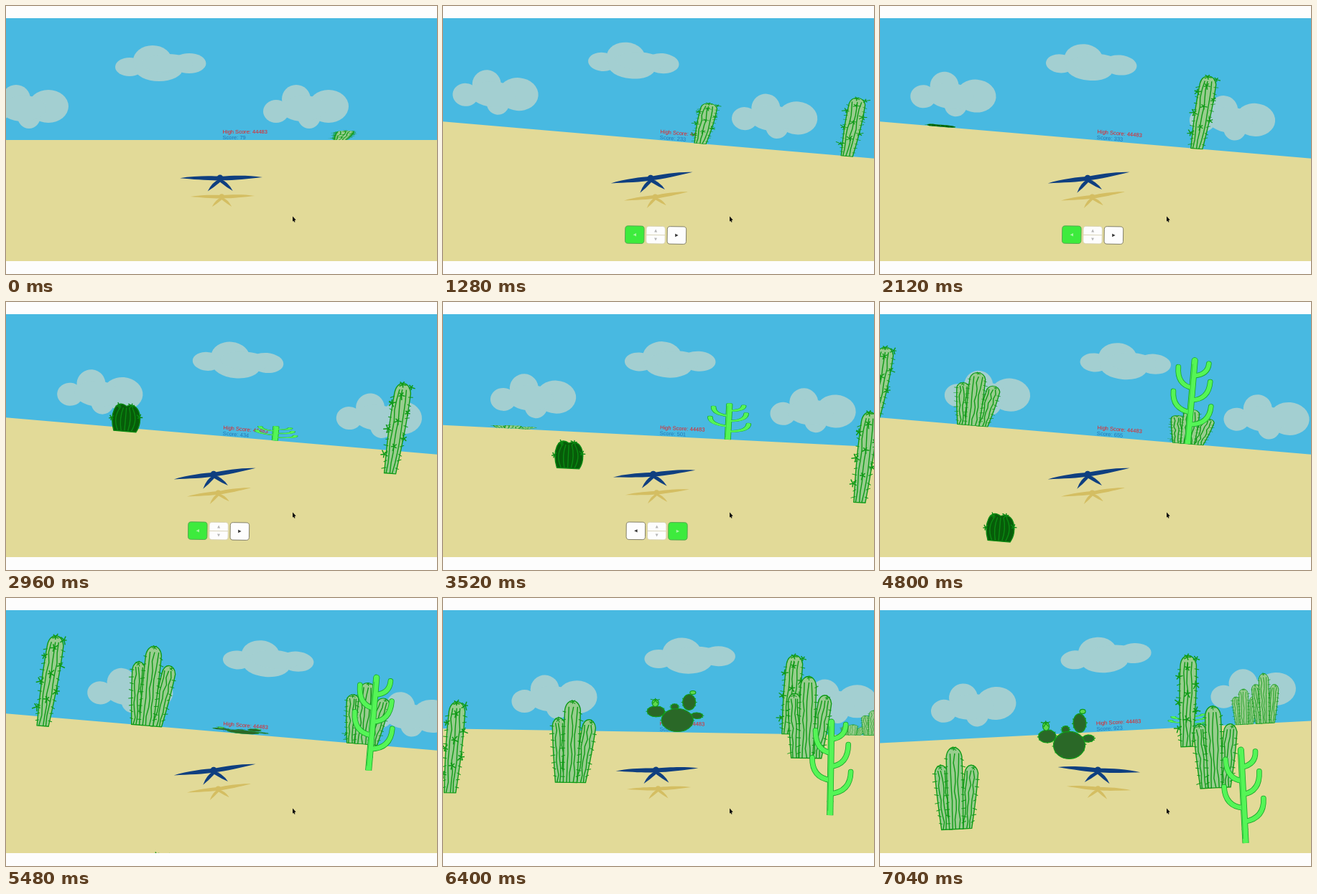
These frames come from a looping animation (600 by 374 pixels, 7.08 s). An HTML page with a canvas:

```html
<!DOCTYPE html>
<html lang="en">
<head>
<meta charset="utf-8">
<title>Desert flight</title>
<style>
html, body { margin: 0; width: 100%; height: 100%; overflow: hidden; background: #fdfdfd; }
canvas { display: block; }
</style>
</head>
<body>
<canvas id="stage" width="600" height="374"></canvas>
<script>
const ctx = document.getElementById('stage').getContext('2d');
const LOOP = 7080, STEP = 40, FRAMES = LOOP / STEP;
const CX = 300, HORIZON = 187, TOP = 17, BOTTOM = 356;

// Speeds per millisecond
const RISE = 0.0545, FALL = 0.083, SPREAD = 0.00016;
const CLOUD_TURN = 0.0345, GROUND_TURN = 0.099, ROLL = 0.006;
const MAX_TILT = 4.9, LAG = 200;

// The pilot steers left first and swaps direction at each later time
const switches = [92, 3190, 3840, 5730];

function steering(t) {
  const n = switches.filter(s => t >= s).length;
  return n && (n % 2 ? 1 : -1);
}

// Flight simulation in small steps, sampled once per frame
const DT = 4;
const flight = [];
for (let t = 0, tilt = 0, sky = 0, yaw = 0, swing = 0; t < LOOP; t += DT) {
  const dir = steering(t);
  if (t % STEP === 0) flight.push({ dir, tilt, sky, yaw });
  tilt = Math.max(-MAX_TILT, Math.min(MAX_TILT, tilt + dir * ROLL * DT));
  sky += dir * CLOUD_TURN * DT;
  swing += (dir - swing) * DT / LAG;
  yaw += swing * GROUND_TURN * DT;
}

function rng(seed) {
  return () => (seed = (seed * 16807) % 2147483647) / 2147483647;
}

function oval(x, y, rx, ry) {
  ctx.beginPath();
  ctx.ellipse(x, y, rx, ry, 0, 0, 7);
  ctx.fill();
}

function line(x1, y1, x2, y2) {
  ctx.beginPath();
  ctx.moveTo(x1, y1);
  ctx.lineTo(x2, y2);
  ctx.stroke();
}

function tuft(x, y, size, rand) {
  const start = rand() * 3;
  for (let i = 0; i < 5; i++) {
    const a = start + i * 1.26, r = size * (0.6 + rand() * 0.6);
    line(x, y, x + Math.cos(a) * r, y + Math.sin(a) * r);
  }
}

// Round-topped column leaning from (base, 0) to (tip, -h), with ribs and thorns
function stem(base, tip, h, w0, w1, rand) {
  const edge = (side, k) =>
    base + (tip - base) * k + side * (w0 + (w1 - w0) * Math.sin(k * 2)) / 2;
  const cap = w1 * 0.6, body = h - cap;
  ctx.beginPath();
  for (let k = 0; k < 1.01; k += 0.1) ctx.lineTo(edge(-1, k), -k * body);
  ctx.bezierCurveTo(edge(-0.8, 1), -h - cap / 3, edge(0.8, 1), -h - cap / 3, edge(1, 1), -body);
  for (let k = 1; k > -0.01; k -= 0.1) ctx.lineTo(edge(1, k), -k * body);
  ctx.closePath();
  ctx.fillStyle = '#98cd8e';
  ctx.strokeStyle = '#0f9a16';
  ctx.lineWidth = 1.4;
  ctx.fill();
  ctx.stroke();
  for (const s of [-0.5, 0, 0.5]) {
    ctx.beginPath();
    for (let k = 0; k <= 0.96; k += 0.12) ctx.lineTo(edge(s, k) + rand() * 3 - 1.5, -k * (h - 4));
    ctx.stroke();
  }
  ctx.lineWidth = 1;
  for (let y = 8; y < body; y += 10) {
    for (const s of [-1, 1]) {
      const x = edge(s, y / h);
      line(x - s * 2, -y, x + s * (2 + rand() * 3), -y + rand() * 6 - 3);
    }
  }
}

const kinds = {
  tall: {
    h: 128,
    draw(rand) {
      stem(0, 8, 127, 16, 23, rand);
      ctx.lineWidth = 1.5;
      for (let i = 0; i < 9; i++) {
        const y = 26 + i * 12;
        tuft(y * 0.06 + (i % 3 - 1) * 12, -y, 6, rand);
      }
      tuft(7, -125, 5, rand);
    }
  },
  cluster: {
    h: 114,
    draw(rand) {
      stem(-14, -18, 90, 15, 18, rand);
      stem(13, 24, 88, 15, 19, rand);
      stem(-1, 1, 114, 19, 22, rand);
      for (const [x, y] of [[1, -112], [27, -84], [-19, -87]]) tuft(x, y, 4, rand);
    }
  },
  saguaro: {
    h: 134,
    draw() {
      for (const [color, grow] of [['#17a528', 1.6], ['#55f556', 0]]) {
        ctx.strokeStyle = color;
        ctx.lineCap = 'round';
        ctx.lineWidth = 6 + grow;
        for (let i = 0; i < 5; i++) {
          const x = (i % 2 ? -1 : 1) * (28 - i * 2), join = -30 - 19 * i;
          ctx.beginPath();
          ctx.moveTo(0, join);
          ctx.quadraticCurveTo(x, join - 3, x, Math.max(-127, join - 31));
          ctx.stroke();
        }
        ctx.lineWidth = 7.5 + grow;
        line(0, -20, 0, -130);
        ctx.lineCap = 'butt';
        line(0, 0, 0, -20);
      }
      ctx.strokeStyle = '#2cc13a';
      ctx.lineWidth = 0.8;
      line(-3, -6, -2.5, -124);
    }
  },
  barrel: {
    h: 46,
    draw(rand) {
      ctx.fillStyle = '#075c09';
      ctx.strokeStyle = '#0a8a12';
      ctx.lineWidth = 1.4;
      ctx.beginPath();
      ctx.moveTo(-15, 0);
      ctx.bezierCurveTo(-23, -22, -16, -46, 0, -35);
      ctx.bezierCurveTo(18, -44, 26, -16, 16, 0);
      ctx.closePath();
      ctx.fill();
      ctx.stroke();
      for (let x = -12; x < 15; x += 6) {
        ctx.beginPath();
        ctx.moveTo(x * 0.8, -1);
        ctx.quadraticCurveTo(x * 1.5, -18, x * 0.7, -33);
        ctx.stroke();
      }
      for (let a = 0.3; a < 3.2; a += 0.9) tuft(20 * Math.cos(a), -14 - 24 * Math.sin(a), 5, rand);
    }
  },
  pear: {
    h: 70,
    draw(rand) {
      const pads = [[18, -50, 9, 13], [29, -28, 8, 5], [-2, -42, 5, 5], [-28, -34, 12, 9], [2, -20, 22, 19]];
      ctx.strokeStyle = '#129a18';
      ctx.lineWidth = 1.2;
      for (const [x, y, rx, ry] of pads) {
        ctx.fillStyle = '#2a6827';
        oval(x, y, rx, ry);
        ctx.stroke();
        for (let a = 0; a < 6.2; a += 0.52) {
          const c = Math.cos(a), s = Math.sin(a) * (0.8 + rand() * 0.2);
          line(x + c * rx, y + s * ry, x + c * (rx + 2), y + s * (ry + 1));
        }
      }
      ctx.fillStyle = '#5fd84e';
      oval(-29, -48, 4.5, 6);
      ctx.stroke();
      oval(23, -66, 4, 3);
      ctx.stroke();
      tuft(-29, -52, 6, rand);
    }
  }
};

// Kind, time at which the plant is fully up at the horizon, starting place, width
const plants = [
  ['tall', 2107, 165],
  ['tall', 2575, -40],
  ['barrel', 2900, -398],
  ['saguaro', 5046, -190],
  ['tall', 5325, -628],
  ['cluster', 5530, -490],
  ['cluster', 6000, -189],
  ['pear', 6600, -358],
  ['tall', 6715, -202],
  ['cluster', 7858, -83, 0.62],
  ['cluster', 8230, -112, 0.58],
  ['saguaro', 9167, -189]
].map(([kind, land, x, wide = 1]) => ({ ...kinds[kind], land, wide, path: walk(x, land) })).reverse();

// Places per frame: turning moves a plant sideways, and it drifts outwards once landed
function walk(x, land) {
  return flight.map((now, i) => {
    if (i) x += now.yaw - flight[i - 1].yaw;
    if (i * STEP > land) x *= 1 + SPREAD * STEP;
    return x;
  });
}

function drawPlant(plant, i, frame) {
  const age = frame * STEP - plant.land;
  const grown = Math.min(1, 1 + age * RISE / plant.h);
  const depth = Math.max(0, age * FALL);
  if (grown <= 0 || depth > 300) return;
  ctx.save();
  ctx.translate(plant.path[frame], depth);
  ctx.scale(plant.wide, grown);
  plant.draw(rng(971 + i * 37));
  ctx.restore();
}

const wideCloud = [[-43, 5, 20, 13], [-11, -4, 27, 21], [-2, 8, 33, 17], [40, 0, 23.5, 14], [10, 0, 35, 13]];
const lumpyCloud = [[-42, 7, 18, 16], [-14, -10, 20, 20], [31, 0, 28, 23], [4, 14, 16, 17], [-4, 3, 32, 18]];

function cloud(lobes, x, y) {
  ctx.fillStyle = '#a3cfd1';
  for (const [dx, dy, rx, ry] of lobes) oval(x + dx, y + dy, rx, ry);
}

function bird(x, y, size, angle, color) {
  ctx.save();
  ctx.translate(x, y);
  ctx.rotate(angle);
  ctx.scale(size, size);
  ctx.fillStyle = color;
  for (const s of [-1, 1]) {
    ctx.beginPath();
    ctx.moveTo(0, -2.5);
    ctx.bezierCurveTo(s * 14, -3.5, s * 38, -4, s * 57.5, -0.7);
    ctx.bezierCurveTo(s * 38, 1.2, s * 14, 3.5, 0, 3);
    ctx.fill();
    ctx.beginPath();
    ctx.moveTo(-1.5, 1);
    ctx.quadraticCurveTo(s * 11 - 1.5, 5, s * 17.5 - 1.5, 18);
    ctx.quadraticCurveTo(s * 9 - 1.5, 13, -1.5, 5.5);
    ctx.fill();
  }
  oval(-1.5, 0, 4.6, 4.8);
  ctx.restore();
}

function keyCap(x, fill, edge) {
  ctx.beginPath();
  ctx.roundRect(x - 13.2, -12.2, 26.4, 24.4, 4);
  ctx.fillStyle = fill;
  ctx.strokeStyle = edge;
  ctx.fill();
  ctx.stroke();
}

function arrow(x, y, dx, dy, color) {
  ctx.beginPath();
  ctx.moveTo(x + dx, y + dy);
  ctx.lineTo(x - dx - dy, y - dy - dx);
  ctx.lineTo(x - dx + dy, y - dy + dx);
  ctx.fillStyle = color;
  ctx.fill();
}

function keypad({ dir, tilt }) {
  ctx.save();
  ctx.translate(300 - 0.8 * tilt, 319.6);
  ctx.rotate(tilt * 0.003);
  ctx.lineWidth = 0.9;
  for (const side of [-1, 1]) {
    const on = side === -dir;
    keyCap(side * 29.3, on ? '#3deb3d' : '#fdfdfd', on ? '#55a04f' : '#77745f');
    arrow(side * 29.3, 0, side * 2.2, 0, on ? '#a9f5a2' : '#333');
  }
  keyCap(0, '#fdfdfd', '#d5d0b0');
  line(-13, 0, 13, 0);
  for (const s of [-1, 1]) arrow(0, s * 6, 0, s * 2, '#b5b5b5');
  ctx.restore();
}

function cursor() {
  ctx.strokeStyle = ctx.fillStyle = '#111';
  ctx.lineWidth = 1.4;
  line(400.3, 298, 402, 301.5);
  ctx.beginPath();
  ctx.moveTo(399, 293.5);
  ctx.lineTo(399, 300.5);
  ctx.lineTo(403.6, 298.6);
  ctx.fill();
}

function draw(frame) {
  const t = frame * STEP, now = flight[frame];
  const rad = now.tilt * Math.PI / 180;
  ctx.fillStyle = '#fdfdfd';
  ctx.fillRect(0, 0, 600, 374);
  ctx.save();
  ctx.beginPath();
  ctx.rect(0, TOP, 600, BOTTOM - TOP);
  ctx.clip();

  ctx.save();
  ctx.translate(CX, HORIZON);
  ctx.rotate(rad);
  ctx.fillStyle = '#48b9e1';
  ctx.fillRect(-400, -300, 800, 302);
  cloud(wideCloud, now.sky - 85, -107);
  for (const x of [-272, 118]) cloud(lumpyCloud, now.sky + x, -47);
  ctx.fillStyle = '#e2da98';
  ctx.fillRect(-400, 0, 800, 300);
  ctx.font = '7.55px "Liberation Sans", Arial, sans-serif';
  ctx.fillStyle = '#ee1c1c';
  ctx.fillText('High Score: 44483', 1.5, -9.5);
  ctx.fillStyle = '#2476b4';
  ctx.fillText('Score: ' + Math.floor(79.75 + 0.11992 * t), 1.5, -1.5);
  plants.forEach((p, i) => drawPlant(p, i, frame));
  ctx.restore();

  const bank = -1.45 * rad - 0.012;
  bird(301.5 - now.tilt, 266, 0.78, bank, '#d4be62');
  bird(299.5 - 1.8 * now.tilt, 240.3, 1, bank, '#0f3f80');
  if (now.dir && t < 4600) keypad(now);
  ctx.restore();
  cursor();
}

const begin = performance.now();
function tick() {
  draw(Math.floor((performance.now() - begin) % LOOP / STEP) % FRAMES);
  requestAnimationFrame(tick);
}
tick();
</script>
</body>
</html>
```
